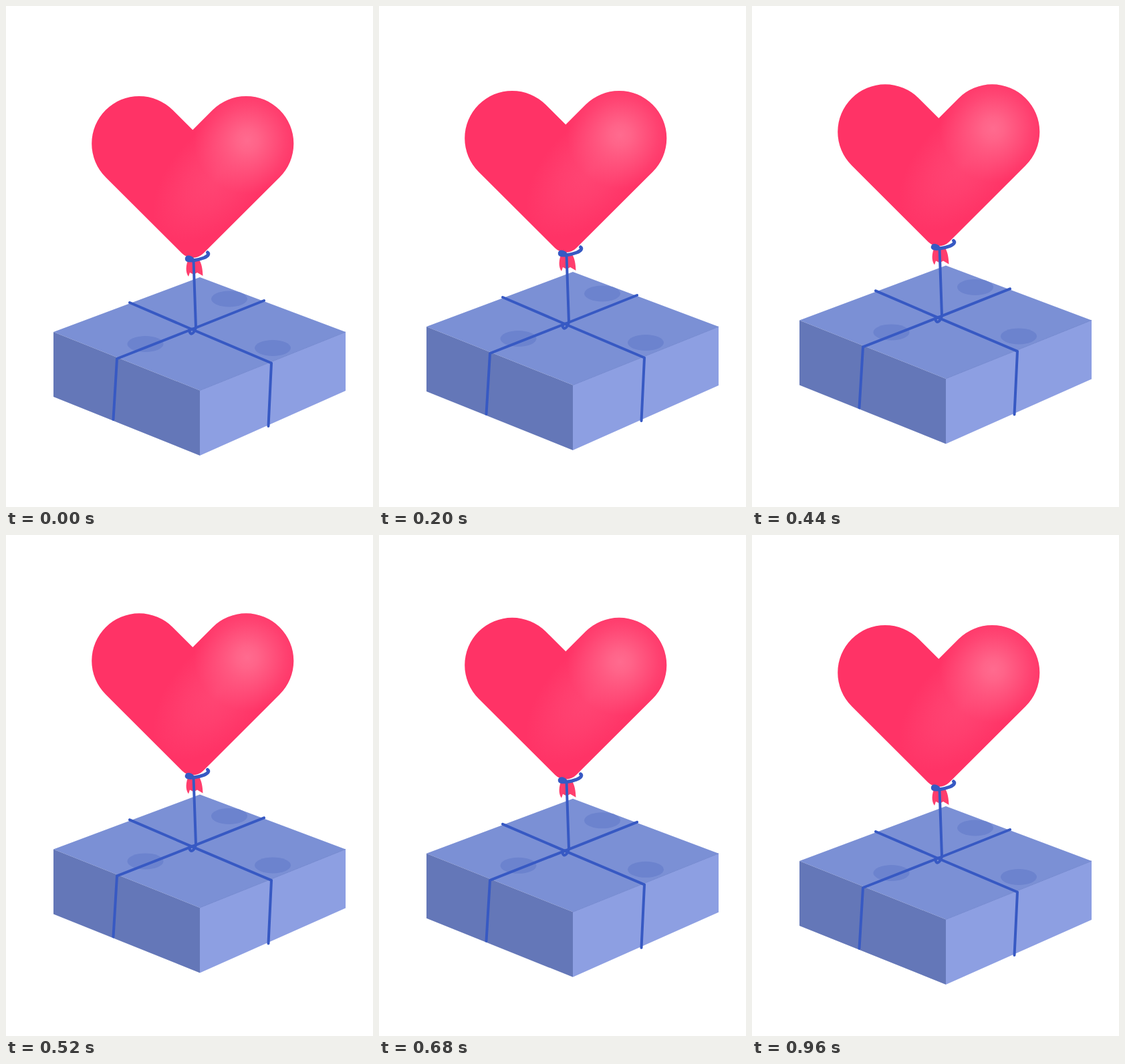
Write an HTML page that moves like this. It is 549 px wide and 750 px high and loops after 1000 ms.

```html
<!DOCTYPE html>
<html lang="en">
<head>
<meta charset="utf-8">
<title>Balloon parcel</title>
<style>
  html, body { margin: 0; width: 100%; height: 100%; overflow: hidden; background: #fff; }
  svg { display: block; width: 100%; height: 100%; }
  .rope { fill: none; stroke: #3759c3; stroke-width: 4; stroke-linecap: round; stroke-linejoin: round; }
</style>
</head>
<body>
<svg viewBox="0 0 549 750">
  <defs>
    <radialGradient id="shine" gradientUnits="userSpaceOnUse" cx="361" cy="201" r="80">
      <stop offset="0" stop-color="#ff6b8f"/>
      <stop offset=".2" stop-color="#ff688c" stop-opacity=".9"/>
      <stop offset="1" stop-color="#ff5c84" stop-opacity="0"/>
    </radialGradient>
    <radialGradient id="glow" gradientUnits="userSpaceOnUse" cx="0" cy="0" r="1"
      gradientTransform="translate(318 252) rotate(133) scale(125 68)">
      <stop offset="0" stop-color="#ff6b8f" stop-opacity=".34"/>
      <stop offset=".5" stop-color="#ff6b8f" stop-opacity=".2"/>
      <stop offset="1" stop-color="#ff6b8f" stop-opacity="0"/>
    </radialGradient>
    <path id="heart" d="M279.3 185.5L249.5 155.8A71 71 0 1 0 149 256.2L263.5 370.5A22.3 22.3 0 0 0 295 370.5L409.5 256.2A71 71 0 1 0 309 155.8Z"/>
  </defs>
  <g id="gift">
    <path fill="#7b90d5" d="M290 406L508 488L290 575.5L71 488Z"/>
    <path fill="#6477b8" d="M71 488L290 575.5V673L71 585Z"/>
    <path fill="#8d9fe2" d="M508 488L290 575.5V673L508 576Z"/>
    <path fill="none" stroke="#7388cf" d="M290 575.5L508 488"/>
    <g fill="#6c83ce">
      <ellipse cx="334" cy="438.5" rx="27" ry="12"/>
      <ellipse cx="208.5" cy="506" rx="27" ry="12"/>
      <ellipse cx="399" cy="512" rx="27" ry="12"/>
    </g>
    <path class="rope" d="M185 444L278 484L397 534.5L392.5 629M386 441L278 484L166 528L160.500 619"/>
    <path fill="#ff3e6d" d="M273 378C269 388 268 398 273 405L275 399L281 402L286 399L294.500 404C294 394 293 386 288 378Z"/>
    <use href="#heart" fill="#ff3366"/>
    <use href="#heart" fill="url(#glow)"/>
    <use href="#heart" fill="url(#shine)"/>
    <path class="rope" d="M280.500 380L284 481C283 488 278 492 276 490C273 487 275 482 281 484"/>
    <path class="rope" style="stroke-width:5" d="M279 379C274 374 269 376 270.500 379.500C273 383 288 380 296 377C303 374 304 371 301.500 369"/>
  </g>
</svg>
<script>
  const gift = document.getElementById("gift");
  const LOOP = 1000, STEP = 40, HALF = 480, SPEED = 0.04;

  // Steady climb and descent, with a short rest at the bottom.
  function draw(now) {
    const t = Math.floor(now % LOOP / STEP) * STEP;
    const lift = SPEED * (HALF - Math.abs(t - HALF));
    gift.setAttribute("transform", `translate(0 ${-lift})`);
  }

  const start = performance.now();
  function tick() {
    draw(performance.now() - start);
    requestAnimationFrame(tick);
  }
  tick();
</script>
</body>
</html>
```
